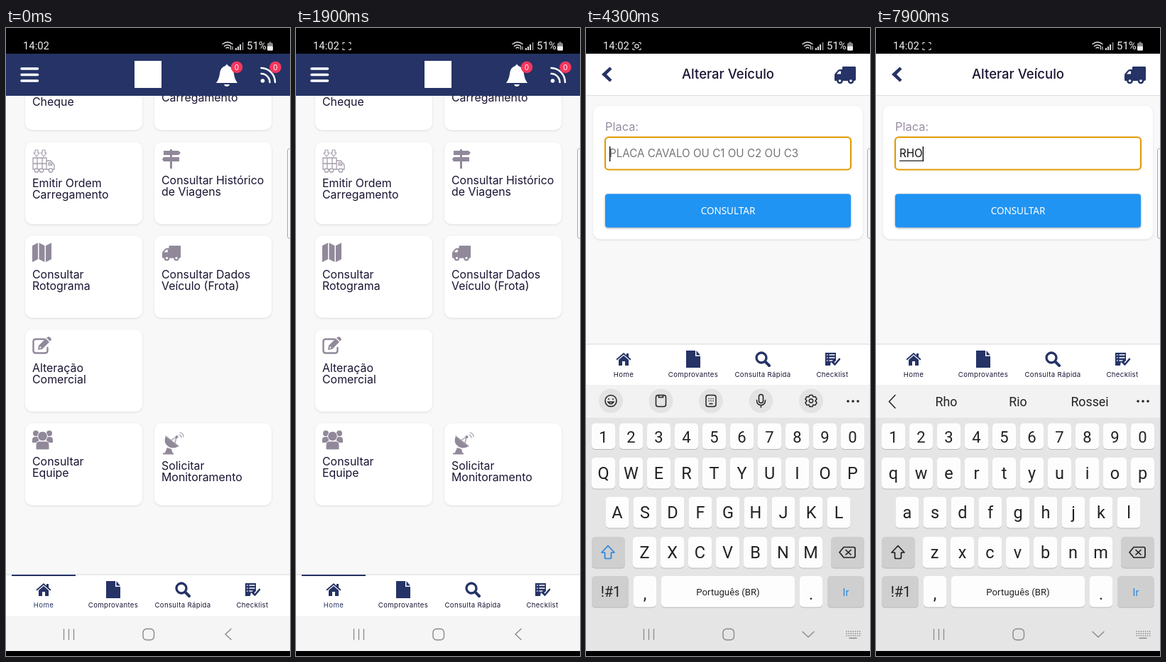
Recreate the animation shown at these times as an HTML page. Size 400 by 880 pixels, loop 8 s.

```html
<!DOCTYPE html>
<html lang="pt-BR">
<head>
<meta charset="utf-8">
<style>
  html, body { margin: 0; width: 100%; height: 100%; overflow: hidden; background: #000; }
  svg { display: block; width: 100vw; height: 100vh; font-family: Inter, sans-serif; fill: #1c1433; }
  .roboto { font-family: Roboto, sans-serif; }
  .mid { text-anchor: middle; }
  .card { fill: #fff; filter: drop-shadow(0 1px 1.5px rgba(0,0,0,.11)); }
  .key { filter: drop-shadow(0 1px .5px rgba(0,0,0,.2)); }
  .gray { fill: #91899a; }
  .navy { fill: #253366; }
  .line { fill: none; stroke-linecap: round; stroke-linejoin: round; }
</style>
</head>
<body>
<svg id="stage" viewBox="0 0 400 880" preserveAspectRatio="none"></svg>
<script>
const text = (x, y, size, str, attrs = '') => `<text x="${x}" y="${y}" font-size="${size}" ${attrs}>${str}</text>`;
const rect = (x, y, w, h, fill, r = 0, attrs = '') =>
  `<rect x="${x}" y="${y}" width="${w}" height="${h}" rx="${r}" fill="${fill}" ${attrs}/>`;
const circle = (x, y, r, attrs = '') => `<circle cx="${x}" cy="${y}" r="${r}" ${attrs}/>`;
const path = (d, attrs = '') => `<path d="${d}" ${attrs}/>`;
const stroke = (d, color, width = 1.5, attrs = '') =>
  path(d, `class="line" stroke="${color}" stroke-width="${width}" ${attrs}`);
const at = (x, y, body, attrs = '') => `<g transform="translate(${x} ${y})" ${attrs}>${body}</g>`;
const group = (id, body, attrs = '') => `<g id="${id}" ${attrs}>${body}</g>`;

const NAVY = '#253366', GRAY = '#91899a', PALE = '#a49dab';

const truck = hole =>
  path('M12 0H29Q30 0 30 1.500V18Q30 20 28 20H1Q0 20 0 18.500V12Q0 10.500 1 9.500L5 5Q6 4 7.500 4H11V1Q11 0 12 0Z') +
  path('M3 10.500L6.500 6.500H9V10.500Z', `fill="${hole}"`) +
  [7.5, 23].map(x => circle(x, 20, 4.3) + circle(x, 20, 1.8, `fill="${hole}"`)).join('');

const icons = {
  order: stroke('M1 12H20V28H1ZM1 20H20M7 12V28M14 12V28M20 16H26L31 22V28H20M23 19H26L28 22H23Z', PALE, 1.3) +
    stroke('M4 1H8V5H10L6 10L2 5H4ZM14 1H18V5H20L16 10L12 5H14Z', PALE, 1.2) +
    [6, 13, 26].map(x => circle(x, 29.5, 2.7, `fill="#fff" stroke="${PALE}" stroke-width="1.300"`)).join(''),
  sign: path('M11 0H14V2H23L26 5L23 8H2V2H11ZM2 11H24V17H2L0 14ZM11 8H14V11H11ZM11 17H14V27H11Z'),
  map: path('M0 4L8 0V23L0 27ZM9.500 0L17.500 4V27L9.500 23ZM19 4L27 0V23L19 27Z'),
  edit: stroke('M17 3H5Q1.500 3 1.500 6.500V19Q1.500 22.500 5 22.500H18Q21.500 22.500 21.500 19V15', GRAY, 2.4) +
    path('M8 18L9 12L19 2L24 7L14 17ZM20 1L22 0Q23 -1 24.500 0L26.500 2Q27.500 3.500 26 5L25 6Z') +
    path('M10 16L11 13L13 15Z', 'fill="#fff"'),
  team: circle(5, 5, 4) + circle(24, 5, 4) + path('M0 18V14Q0 10 4 10H9V18ZM29 18V14Q29 10 25 10H20V18Z') +
    circle(14.5, 9, 6.8, 'stroke="#fff"') + path('M5 27V22Q5 16 10 16H19Q24 16 24 22V27Q24 28 22 28H7Q5 28 5 27Z', 'stroke="#fff"'),
  dish: path('M5 6Q1 15 8 20Q15 25 23 20ZM3 31L7 22L13 24L15 31Z') +
    stroke('M5 6L23 20M12 12L20 7L18 16', PALE, 1.4) + circle(20.5, 7, 2) +
    stroke('M24 4Q27 5 27 8M25 1Q30 2 30 7', PALE, 1.2) + path('M1 29.500H16V31.500H1Z'),
  truck: `<g transform="scale(.87)">${truck('#fff')}</g>`
};

const cards = [
  [27, 28, '', 0, 0, 109, 'Cheque'],
  [209, 28, '', 0, 0, 103, 'Carregamento'],
  [27, 160, 'order', 37, 170, 223, 'Emitir Ordem', 'Carregamento'],
  [209, 160, 'sign', 220, 170, 219, 'Consultar Histórico', 'de Viagens'],
  [27, 291, 'map', 37, 301, 351, 'Consultar', 'Rotograma'],
  [209, 291, 'truck', 220, 305, 351, 'Consultar Dados', 'Veículo (Frota)'],
  [27, 422.5, 'edit', 37, 433, 482, 'Alteração', 'Comercial'],
  [27, 554, 'team', 37, 563, 613, 'Consultar', 'Equipe'],
  [209, 554, 'dish', 220, 566, 619, 'Solicitar', 'Monitoramento']
].map(([x, y, icon, ix, iy, base, ...lines]) =>
  rect(x, y, 165, 115, '#fff', 10, 'class="card"') +
  (icon && at(ix, iy, icons[icon], 'class="gray"')) +
  lines.map((s, i) => text(x + 10, base + 16 * i, 15.9, s)).join('')).join('');

const badge = x => circle(x, 55, 8.3, 'fill="#f4375f"') + text(x, 58.5, 10, 0, 'class="mid" fill="#fff"');

const home = rect(0, 95, 400, 729, '#f8f8f8') + cards + rect(0, 36, 400, 59, NAVY) +
  stroke('M22 57H44.500M22 65.500H44.500M22 74H44.500', '#fff', 3.6) +
  rect(181, 46, 38, 38, '#fff') +
  path('M296 77Q300 72 301 64Q302 55 309 53Q311 49 313 53Q320 55 321 64Q322 72 326 77ZM307 79H315Q314 82 311 82Q308 82 307 79Z', 'fill="#fff"') +
  badge(325) +
  circle(361.5, 74, 2.8, 'fill="#fff"') +
  stroke('M359.500 64A12 12 0 0 1 371.500 76M359.500 56A20 20 0 0 1 379 76', '#fff', 2.5) + badge(379.5);

const form = rect(0, 36, 400, 788, '#f8f8f8') + rect(0, 36, 400, 58, '#fff') + rect(0, 94, 400, 1, '#dedee4') +
  path('M33.500 54.500L36.500 57.500L29 65L36.500 72.500L33.500 75.500L22 65Z', 'class="navy"') +
  text(200, 71, 18.5, 'Alterar Veículo', 'class="mid" font-weight="500"') +
  at(350, 54, truck('#fff'), 'class="navy"') +
  rect(10, 109, 380, 187, '#fff', 10, 'class="card"') +
  text(27, 144, 16.4, 'Placa:', 'fill="#988da3"') +
  rect(27, 153, 346, 45.5, '#fff', 5, 'id="field"') +
  text(33, 181, 15.2, 'PLACA CAVALO OU C1 OU C2 OU C3', 'id="hint" fill="#757575"') +
  text(33, 181, 15.2, '', 'id="typed" fill="#111"') +
  rect(33, 185.5, 0, 1.2, '#111', 0, 'id="underline"') + rect(33, 166, 1.3, 21, '#000', 0, 'id="caret"') +
  rect(27, 232.5, 346, 47, '#2094f3', 4, 'style="filter:drop-shadow(0 1.5px 1.5px rgba(0,0,0,.35))"') +
  text(200, 261, 13.5, 'CONSULTAR', 'class="mid" fill="#fff" font-family="Noto Sans, sans-serif"');

const tabIcons = [
  path('M-10.500 0L0 -9L4 -5.500V-8H7V-3L10.500 0L9.300 1.500L0 -6.500L-9.300 1.500ZM-7 1L0 -5L7 1V9H2V3H-2V9H-7Z'),
  path('M-10 -12H3V-4H10V12H-10ZM4.500 -12L10 -5.500H4.500Z'),
  circle(-2, -2, 7, `fill="none" stroke="${NAVY}" stroke-width="3.300"`) + stroke('M3.500 3.500L9 9', NAVY, 4),
  path('M-10 -9H5V2L1 6L-2 4L-3 9H-10Z') +
    stroke('M-7.500 -6H-7M-4 -6H3M-7.500 -2H-7M-4 -2H3M-7.500 2H-7M-4 2H0', '#fff', 1.4) + stroke('M0 4L3.500 7.500L10 0', NAVY, 2.6)
];
const tabs = rect(0, 766, 400, 58, '#fff') + rect(0, 765.5, 400, 1, '#dadada') +
  rect(8, 766, 90, 2, NAVY, 0, 'id="marker"') +
  ['Home', 'Comprovantes', 'Consulta Rápida', 'Checklist'].map((s, i) =>
    at(53 + 98 * i, 787, tabIcons[i], 'class="navy"') +
    text(53 + 98 * i, 812, 9.6, s, `class="mid" letter-spacing=".35" ${i ? '' : 'id="homeLabel"'}`)).join('');

const sheet = rect(16, 549, 368, 259, '#fff', 18) + rect(16, 597, 368, 1, '#dcdcdc') +
  text(200, 579, 16.8, 'Selecione uma ação', 'class="mid" font-weight="500"') +
  ['Contrato', 'Motorista', 'Veículo', 'Cancelar'].map((s, i) =>
    text(35, 629.5 + 52.3 * i, 16.5, s, i === 3 ? 'fill="#e23463"' : '')).join('');

const INK = '#222';
const key = (x, y, w, h, fill = '#fdfdfd') => rect(x, y, w, h, fill, 5, 'class="key"');
const keyRow = (chars, x0, y, h) => [...chars].map((c, i) =>
  key(x0 + 39 * i, y, 33, h) +
  text(x0 + 16.5 + 39 * i, y + h / 2 + 8.5, h < 40 ? 22 : 23.5, c, `class="mid ${h < 40 ? '' : 'letter'}"`)).join('');
const dots = path('M369 523h.01M376 523h.01M383 523h.01', `stroke="${INK}" stroke-width="3.600" stroke-linecap="round"`);

const tools = [
  circle(0, 0, 8, 'class="line"') + path('M-4 1.500Q0 7 4 1.500ZM-3 -3v1M3 -3v1'),
  rect(-7, -8, 14, 16, 'none', 3) + path('M-3 -8V-5H3V-8'),
  rect(-7, -8, 14, 16, 'none', 3) + path('M-3 -3h.1M0 -3h.1M3 -3h.1M-3 0h.1M0 0h.1M3 0h.1M-2 4H2'),
  rect(-3, -9, 6, 12, 'none', 3) + path('M-6 -1Q-6 6 0 6Q6 6 6 -1M0 6V9'),
  path('M-2 -8H2L3 -5.500L6 -6L8 -2.500L6 0L8 2.500L6 6L3 5.500L2 8H-2L-3 5.500L-6 6L-8 2.500L-6 0L-8 -2.500L-6 -6L-3 -5.500Z') + circle(0, 0, 2.7)
].map((icon, i) => circle(35 + 70.5 * i, 522.5, 17, 'fill="#e3e3e3"') +
  at(35 + 70.5 * i, 522.5, icon, `fill="none" stroke="${INK}" stroke-width="1.500" stroke-linecap="round"`)).join('');

const keyboard = rect(0, 500, 400, 46, '#f2f2f2') + rect(0, 546, 400, 327, '#e5e5e5') + dots +
  group('tools', tools) +
  group('suggestions', stroke('M27 514.500L18.500 523.500L27 532.500', INK) +
    [99, 200, 301].map(x => text(x, 529.5, 17.8, '', 'class="mid word"')).join('')) +
  keyRow('1234567890', 8, 554, 36) + keyRow('qwertyuiop', 8, 602, 43.5) +
  keyRow('asdfghjkl', 27.5, 657, 43.5) + keyRow('zxcvbnm', 66, 713, 43.5) +
  key(8, 713, 47, 43.5, '#cfcfcf') + key(345, 713, 47, 43.5, '#cfcfcf') +
  stroke('M31 725.500L40 735H35.500V741.500Q35.500 743.500 33.500 743.500H28.500Q26.500 743.500 26.500 741.500V735H22Z', INK, 1.7, 'id="shift"') +
  stroke('M363 727.500H377Q379 727.500 379 729.500V740Q379 742 377 742H363L357 734.800ZM366 731.500L373 738M373 731.500L366 738', INK, 1.7) +
  key(8, 768, 52, 43.5, '#cfcfcf') + key(67, 768, 32, 43.5) + key(106, 768, 188, 43.5) +
  key(301, 768, 32, 43.5) + key(340, 768, 52, 43.5, '#cfcfcf') +
  text(35, 797, 20, '!#1', 'class="mid"') + text(83, 801, 23, ',', 'class="mid"') +
  text(200, 795, 13.2, 'Português (BR)', 'class="mid"') + text(317, 801, 23, '.', 'class="mid"') +
  text(366, 795.5, 14.5, 'Ir', 'class="mid" fill="#2a86dc"');

const navBar = rect(0, 824, 400, 49, '#f5f5f5', 0, 'id="navBg"') + rect(0, 873, 400, 7, '#000') +
  stroke('M81.500 842.500V857M88.500 842.500V857M95.500 842.500V857', '#8a8a8a', 1.3) +
  rect(193, 842, 15.5, 15.5, 'none', 5, 'stroke="#8a8a8a" stroke-width="1.400"') +
  stroke('', '#8a8a8a', 1.4, 'id="back"') +
  group('dotsKey', stroke('M367 845.500H386M367 848.500H386M367 851.500H386', '#8a8a8a', 1.7, 'style="stroke-dasharray:.1 3"') +
    stroke('M371 855H381', '#8a8a8a', 1.5));

const status = rect(0, 0, 400, 36, '#000') +
  `<g class="roboto" fill="#eee">${text(24, 30, 14.8, '14:02')}${text(339, 30, 15, '51%')}</g>` +
  group('recorder', stroke('M66 22.500V20.500H68.500M74.500 20.500H77V22.500M66 28.500V30.500H68.500M74.500 30.500H77V28.500', '#ddd', 1.2) +
    circle(71.5, 25.5, 2.6, 'id="dot" fill="none" stroke="#ddd" stroke-width="1.300"')) +
  stroke('M305 22.500Q312 17 319 22.500M307.500 25.500Q312 22 316.500 25.500M310 28Q312 26.500 314 28', '#ddd', 1.5) +
  stroke('M316.500 26V30M319 26V30', '#ddd', 1.1) +
  path('M323 28H325V31H323ZM326 26H328V31H326ZM329 23H331V31H329Z', 'fill="#ddd"') +
  path('M332.500 20H334.500V31H332.500Z', 'fill="#777"') +
  rect(368, 21, 8, 10.5, '#888', 1.5) + rect(368, 25.5, 8, 6, '#eee', 1.5) + rect(370.5, 19.5, 3, 2, '#888');

const edgeHandle = rect(396.5, 169, 9, 126, '#fafafa', 3, 'fill-opacity=".5" stroke="#a9a9a9"');

document.getElementById('stage').innerHTML = group('home', home) + group('form', form) + group('tabs', tabs) +
  rect(0, 36, 400, 788, '#000', 0, 'id="dim"') + group('sheet', sheet) +
  group('keyboard', keyboard, `class="roboto" fill="${INK}"`) + navBar + status + edgeHandle;

const ui = Object.fromEntries([...document.querySelectorAll('[id]')].map(n => [n.id, n]));
const letters = [...document.querySelectorAll('.letter')].map(node => ({ node, char: node.textContent }));
const words = [...document.querySelectorAll('.word')];

// Each edit: time, field value, suggestions.
const edits = [
  [3300, ''],
  [5200, 'R', 'r', 'recebi', 'realmente'],
  [6000, ''],
  [6500, 'R', 'R', 'Recebi', 'Realmente'],
  [7000, 'RH', 'Rh', 'Rho', 'Rio'],
  [7500, 'RHO', 'Rho', 'Rio', 'Rossei']
];
const dotToggles = [1200, 1700, 2200, 2700, 3200, 3800, 4300, 4800, 5300, 5800, 6200, 6800, 7300, 7800];

const easeOut = (t, start, length) => 1 - (1 - Math.min(1, Math.max(0, (t - start) / length))) ** 3;
const show = (node, on) => node.setAttribute('visibility', on ? 'visible' : 'hidden');
const set = (node, attrs) => { for (const name in attrs) node.setAttribute(name, attrs[name]); };
const shiftY = (node, y) => set(node, { transform: `translate(0 ${y})` });

function draw(t) {
  const opened = easeOut(t, 300, 500) - easeOut(t, 1550, 330);
  set(ui.dim, { opacity: opened / 2 });
  shiftY(ui.sheet, 331 * (1 - opened));
  show(ui.sheet, opened > 0);

  const entered = easeOut(t, 2250, 400);
  set(ui.form, { opacity: entered });
  shiftY(ui.form, 40 * (1 - entered));
  set(ui.marker, { opacity: 1 - entered });
  set(ui.homeLabel, { fill: entered < .5 ? NAVY : '#1c1433' });

  const focused = t >= 3200, typing = t >= 3300;
  shiftY(ui.keyboard, 373 * (1 - easeOut(t, 3250, 300)));
  show(ui.keyboard, focused);
  shiftY(ui.tabs, t >= 3500 ? -323 : 0);
  set(ui.field, { stroke: focused ? '#e19c08' : '#9c9c9c', 'stroke-width': focused ? 2.2 : 1 });
  set(ui.navBg, { fill: typing ? '#e5e5e5' : '#f5f5f5' });
  set(ui.back, { d: typing ? 'M305 846L313 853.500L321 846' : 'M317 842L309 849.500L317 857' });
  show(ui.dotsKey, typing);

  const [since, value, ...options] = edits.filter(e => e[0] <= t).pop() || edits[0];
  ui.typed.textContent = value;
  const width = value ? ui.typed.getComputedTextLength() : 0;
  set(ui.underline, { width });
  set(ui.caret, { x: 33 + width });
  show(ui.caret, typing && (t - since) % 1000 < 500);
  show(ui.hint, !value);

  const upper = t < 4600 || (t >= 6000 && t < 6500);
  letters.forEach(({ node, char }) => { node.textContent = upper ? char.toUpperCase() : char; });
  set(ui.shift, { stroke: upper ? '#2a86dc' : INK });
  set(ui.tools, { display: value ? 'none' : 'inline' });
  set(ui.suggestions, { display: value ? 'inline' : 'none' });
  words.forEach((node, i) => { node.textContent = options[i] || ''; });

  show(ui.recorder, t >= 200);
  set(ui.dot, { opacity: dotToggles.filter(time => time <= t).length % 2 });
}

const start = performance.now();
function tick() {
  draw((performance.now() - start) % 8000);
  requestAnimationFrame(tick);
}
tick();
</script>
</body>
</html>
```
